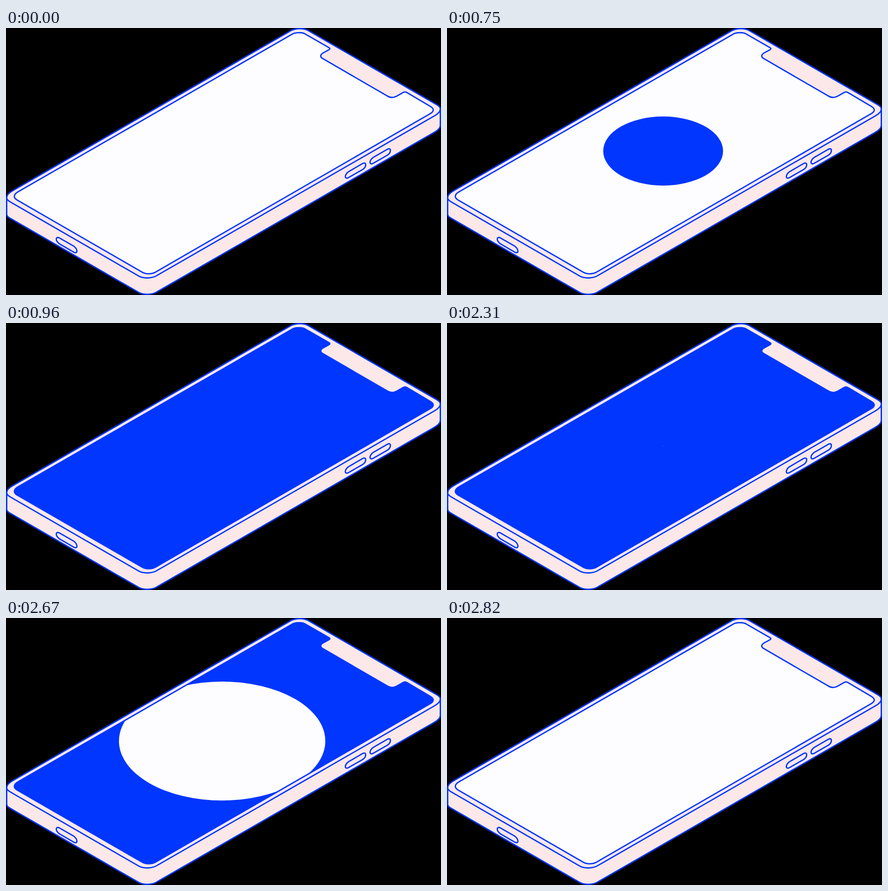
These frames come from a looping animation (954 px wide and 587 px high, 3600 ms). An HTML page:

```html
<!DOCTYPE html>
<html lang="en">
<head>
<meta charset="utf-8">
<title>Phone screen colour wipe</title>
<style>
  html, body { margin: 0; width: 100%; height: 100%; overflow: hidden; background: #000; }
  svg { display: block; width: 954px; height: 587px; }
  .line { stroke: #0036fd; stroke-width: 2.9; stroke-linejoin: round; }
</style>
</head>
<body>
<svg viewBox="0 0 954 587">
  <defs>
    <path id="screen" d="M27 359.8 L629 12.8 C634 9.9 649 9.2 655 12.5 L708 43 Q712.5 45.6 708 48
      L696 54.6 C689 58.5 688.5 63.5 694 66.8 L836 149.3 C842 153.5 850 153.5 857 149.8
      L871 141.8 Q875 139.4 879 141.8 L930 172 C939.3 177.4 939.3 183.2 930 188.6
      L327 537.2 C318 541.7 306 541.2 299 537 L24 378 C16 373 16 366 27 359.8Z"/>
    <path id="button" d="M752 315.4 L782 298.1 C786 295.8 788.8 297 788.8 300.5 C788.8 304.5 786 308.8 782 311.2
      L751 328.9 C747 331.2 744.2 330 744.2 326.5 C744.2 322.5 748 317.7 752 315.4Z"/>
    <clipPath id="clip"><use href="#screen"/></clipPath>
  </defs>
  <g class="line" fill="#fce8e8">
    <path d="M1.5 373 V409 C1.5 413.5 4.5 415.7 10 418.8 L291 581.3 C302 587.6 321 586.6 332 579.6
      L939 229.5 C948 224.5 952.5 220 952.5 214 V178Z"/>
    <path d="M15 357.5 L622 7.4 C633 .4 652 -.6 663 5.7 L944 168.2 C949 171 952.5 174.5 952.5 178
      C952.5 184 948 188.5 939 193.5 L332 543.6 C321 550.6 302 551.6 291 545.3
      L10 382.8 C5 380 1.5 376.5 1.5 373 C1.5 367 6 362.5 15 357.5Z"/>
    <use href="#button"/>
    <use href="#button" x="54.2" y="-31.4"/>
    <path d="M117 461.5 L148 479.3 C152 481.7 155.5 486.5 155.5 490.5 C155.5 494 152.5 495 149 493
      L118 475 C114 472.7 110.3 468 110.3 464.2 C110.3 460.5 113.5 459.5 117 461.5Z"/>
  </g>
  <use id="base" href="#screen"/>
  <g clip-path="url(#clip)"><ellipse id="wipe" cx="474" cy="270.5"/></g>
  <use class="line" href="#screen" fill="none"/>
</svg>
<script>
const LOOP = 3600, TO_BLUE = 450, TO_WHITE = 2310, GROW = 800;
const BLUE = '#0036fd', WHITE = '#fdfdff';
const base = document.getElementById('base');
const wipe = document.getElementById('wipe');

const easeInOut = p => p < 0.5 ? 4 * p ** 3 : 1 - 4 * (1 - p) ** 3;

function draw() {
  const t = performance.now() % LOOP;
  const toBlue = t >= TO_BLUE && t < TO_WHITE;
  const elapsed = t < TO_BLUE ? GROW : t - (toBlue ? TO_BLUE : TO_WHITE);
  const ry = 0.35 + 354.5 * easeInOut(Math.min(elapsed / GROW, 1));
  base.setAttribute('fill', toBlue ? WHITE : BLUE);
  wipe.setAttribute('fill', toBlue ? BLUE : WHITE);
  wipe.setAttribute('ry', ry);
  wipe.setAttribute('rx', ry * Math.sqrt(3));
  requestAnimationFrame(draw);
}
draw();
</script>
</body>
</html>
```
